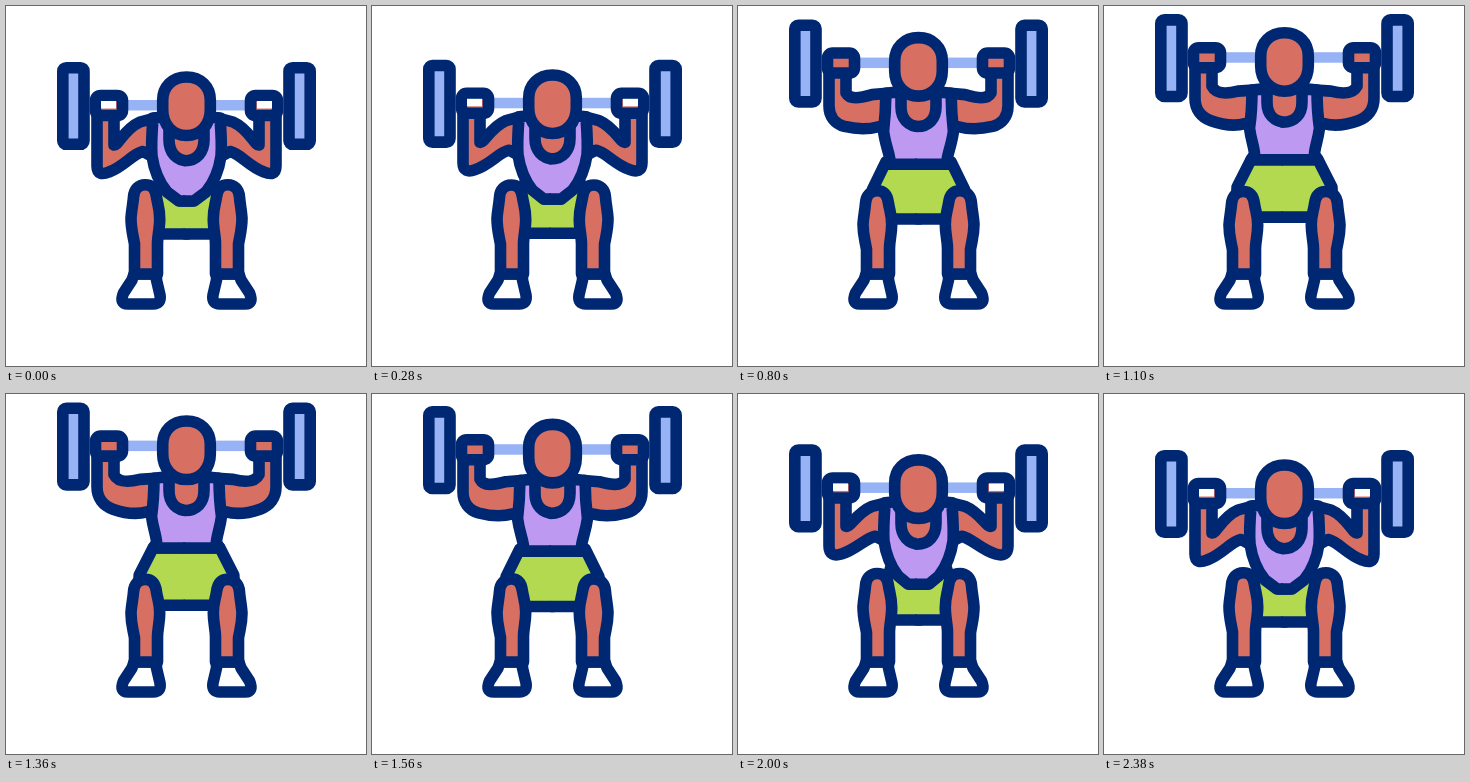
Animation of 360 by 360 pixels, one loop 2.4 s. Source, as an HTML page:

```html
<!DOCTYPE html>
<html lang="en">
<head>
<meta charset="utf-8">
<title>Barbell squat</title>
<style>
  html, body { margin: 0; width: 100%; height: 100%; overflow: hidden; background: #fff; }
  svg { display: block; width: 100vmin; height: 100vmin; }
  .line { stroke: #002872; stroke-width: 11.6; stroke-linejoin: round; stroke-linecap: round; }
  .skin { fill: #d76f62; }
  .vest { fill: #bd99f2; }
  .shorts { fill: #b2d94f; }
  .steel { fill: #97b3f5; }
  .white { fill: #fff; }
</style>
</head>
<body>
<svg viewBox="0 0 360 360">
  <defs>
    <g id="body">
      <path id="arm" class="line skin"/>
      <path id="shorts" class="line shorts"/>
      <path id="vest" class="line vest"/>
      <path id="neck" class="line skin"/>
      <path class="line white" d="M128 268L126 274L117.500 287Q113 298 122 298H147Q155.500 298 154 289L150.500 274V268Z"/>
      <path id="leg" class="line skin"/>
    </g>
    <g id="grip">
      <rect class="line skin" x="89.500" y="89.500" width="27" height="20" rx="5"/>
      <rect class="white hand" x="95" y="95" width="15" height="7.500"/>
      <rect class="line steel" x="56.800" y="61.700" width="21.200" height="76.600" rx="3.500"/>
    </g>
  </defs>
  <rect class="steel lift" x="118" y="94" width="125" height="10.500"/>
  <use href="#body"/>
  <use href="#body" transform="matrix(-1 0 0 1 361 0)"/>
  <path id="head" class="line skin" d="M180.500 71C195 71 204.300 81 204.300 94V104C204.300 119 194 129.500 180.500 129.500C167 129.500 156.700 119 156.700 104V94C156.700 81 166 71 180.500 71Z"/>
  <g class="lift">
    <use href="#grip"/>
    <use href="#grip" transform="matrix(-1 0 0 1 361 0)"/>
  </g>
</svg>
<script>
  const LOOP = 2400, HALF = LOOP / 2;
  const $ = id => document.getElementById(id);

  // Each shape: squatting pose, standing pose
  const poses = {
    arm: [
      'M91 100L91 160C91 168 96 169 103 166C119 160 126 148 137 145.5L149 152L149 112L134 116C118 123 112 140 108 139L108 105Z',
      'M91 53L91 92C91 103 97 111 107 114.5C118 118.5 130 120.5 141 117.5L147 119L149 84L134 85C122 88 112 88 108 80L108 53Z'
    ],
    shorts: [
      'M182 195L174 195L154 175L146 200L140 228L182 228',
      'M182 153.5L165 153.5L147 153.5L133 181L132 211L182 211'
    ],
    vest: [
      'M182 112L157 111L147 112C146 125 145 138 146 150C148 164 152 175 161 186L173 195L182 195',
      'M182 84L157 83L148 84C148 100 147 112 145.5 122C147 134 150 140 150.5 148L147 153.5L182 153.5'
    ],
    neck: [
      'M182 120L163 120L163 134C163 146 170 154.7 182 154.7',
      'M182 80L163 80L163 96C163 108 170 116 182 116'
    ],
    leg: [
      'M128.5 268L128.5 238C127 229 125 223 125 212C125.5 204 127 198 127.5 191C128 183 133 178.7 139 178.7C146 178.7 149.5 183 150.5 191C151.5 198 153.7 202 153.7 213C153.7 223 151.5 230 151.5 238L151.5 268Z',
      'M128.5 268L128.5 244C127 235 125 230 125 219C125.5 211 127 205 127.5 198C128 190 133 185.5 139 185.5C146 185.5 149.5 190 150.5 198C151.5 205 153.7 209 153.7 219C153.7 229 151.5 235 151.5 243L151.5 268Z'
    ]
  };

  const mix = ([a, b], k) => {
    const to = b.match(/[\d.]+/g);
    let i = 0;
    return a.replace(/[\d.]+/g, n => (+n + (to[i++] - n) * k).toFixed(2));
  };

  // Solves cubic-bezier(.75, 0, .25, 1) by bisection
  const ease = x => {
    let lo = 0, hi = 1, t = 0.5;
    for (let i = 0; i < 24; i++) {
      t = (lo + hi) / 2;
      if (2.25 * t - 3.75 * t * t + 2.5 * t ** 3 < x) lo = t; else hi = t;
    }
    return t * t * (3 - 2 * t);
  };

  const shift = (el, y) => el.setAttribute('transform', `translate(0 ${y.toFixed(2)})`);
  const lifts = document.querySelectorAll('.lift');
  const hand = document.querySelector('.hand');

  function draw(ms) {
    const t = ms % LOOP;
    const k = ease(t < HALF ? t / HALF : (LOOP - t) / HALF);
    for (const id in poses) $(id).setAttribute('d', mix(poses[id], k));
    lifts.forEach(el => shift(el, -48 * k));
    shift($('head'), -44.5 * k);
    hand.setAttribute('visibility', k < 0.18 ? 'visible' : 'hidden');
  }

  const start = performance.now();
  function tick() {
    draw(performance.now() - start);
    requestAnimationFrame(tick);
  }
  draw(0);
  requestAnimationFrame(tick);
</script>
</body>
</html>
```
